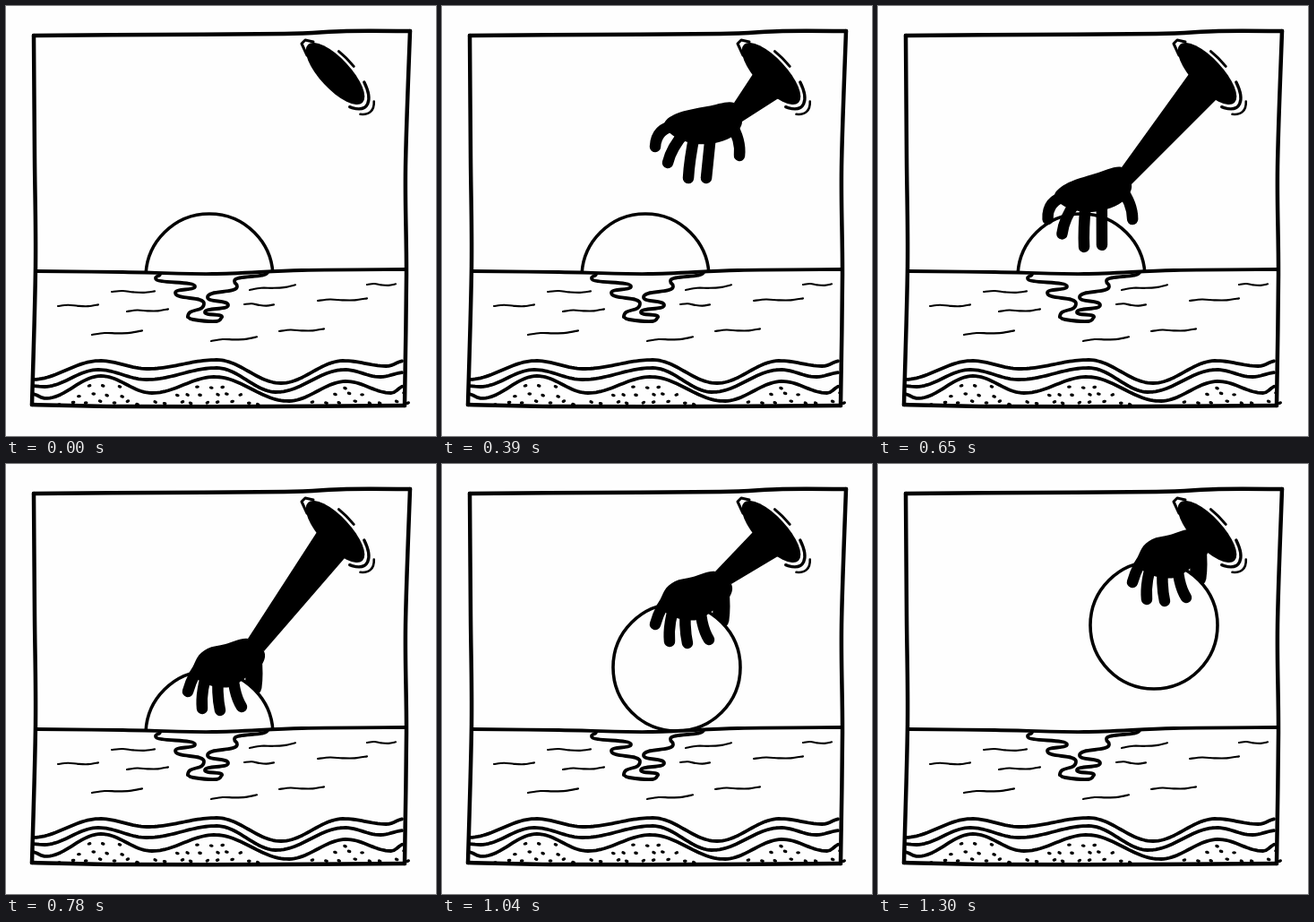
Write an HTML page with a canvas that moves like this. It is 480 by 480 pixels and loops after 1430 ms.

```html
<!DOCTYPE html>
<html lang="en">
<head>
<meta charset="utf-8">
<title>Hand taking the sun</title>
<style>
html, body { margin: 0; width: 100%; height: 100%; overflow: hidden; background: #fefefe; }
canvas { display: block; width: 480px; height: 480px; }
</style>
</head>
<body>
<canvas id="stage" width="480" height="480"></canvas>
<script>
const ctx = document.getElementById('stage').getContext('2d');
const INK = '#000', PAPER = '#fefefe';
const STEP = 130, STEPS = 11, HORIZON = 297;

// Hands are measured from the upper side of the wrist.
// A finger is base, bend, tip; the thumb comes last.
const OPEN = {
  palm: [[0, 0], [-30, 4], [-64, 12], [-78, 24], [-66, 38], [-42, 46], [-17, 44], [0, 36], [9, 21]],
  fingers: [
    [-64, 25, -87, 28, -88, 49], [-54, 32, -70, 50, -74, 67],
    [-44, 35, -50, 65, -51, 84], [-26, 35, -29, 65, -31, 84], [-4, 22, 8, 42, 6, 59]
  ]
};
const GRIP = {
  palm: [[0, 0], [-25, 6], [-45, 11], [-57, 22], [-61, 40], [-43, 52], [-20, 54], [-3, 44], [15, 30], [18, 14]],
  fingers: [
    [-49, 25, -61, 38, -67, 59], [-43, 30, -53, 58, -51, 78],
    [-33, 35, -35, 62, -31, 80], [-17, 30, -17, 60, -7, 76], [6, 20, 8, 40, 6, 54]
  ]
};
const PULL = [[270, 195], [283, 173], [305, 120], [328, 96], [351, 73]];

// Crests and troughs of the three surf lines
const SURF = [
  [[29, 417], [105, 396], [158, 405], [235, 395], [307, 421], [377, 396], [425, 402], [445, 396]],
  [[29, 424], [42, 425], [103, 406], [157, 417], [235, 404], [302, 431], [378, 406], [418, 414], [445, 409]],
  [[29, 433], [44, 438], [106, 413], [163, 432], [233, 414], [315, 441], [380, 419], [430, 432], [445, 424]]
];

// x, y, length, rise
const RIPPLES = [
  [118, 319, 48, 0], [58, 335, 45, 1], [135, 341, 46, 2], [96, 367, 56, 4], [229, 374, 51, 4],
  [305, 363, 50, 2], [266, 333, 33, -1], [272, 317, 51, 5], [348, 329, 55, 2], [403, 311, 32, 0]
];

const BORDER = [
  [[31, 33], [171, 32], [311, 31], [380, 28], [451, 28]],
  [[451, 28], [446, 180], [447, 300], [445, 446]],
  [[29, 445], [130, 447], [300, 447], [445, 446]],
  [[31, 33], [32, 170], [33, 290], [29, 445]]
];

// Small seeded generator
function random(seed) {
  return () => (seed = seed * 16807 % 2147483647) / 2147483647;
}

// Smooth curve through points
function trace(pts, closed) {
  const n = pts.length;
  const at = i => pts[closed ? (i + n) % n : Math.max(0, Math.min(n - 1, i))];
  ctx.beginPath();
  ctx.moveTo(...pts[0]);
  for (let i = 0; i < (closed ? n : n - 1); i++) {
    const [a, b, c, d] = [at(i - 1), at(i), at(i + 1), at(i + 2)];
    ctx.bezierCurveTo(
      b[0] + (c[0] - a[0]) / 6, b[1] + (c[1] - a[1]) / 6,
      c[0] - (d[0] - b[0]) / 6, c[1] - (d[1] - b[1]) / 6, ...c);
  }
}

function polyline(pts) {
  ctx.beginPath();
  pts.forEach(p => ctx.lineTo(...p));
}

function stroke(width) {
  ctx.lineWidth = width;
  ctx.stroke();
}

function fill(color = INK) {
  ctx.fillStyle = color;
  ctx.fill();
}

// Path that swings from one turning point to the next
function swing(pts) {
  ctx.beginPath();
  ctx.moveTo(...pts[0]);
  for (let i = 1; i < pts.length; i++) {
    const [[x, y], [u, v]] = [pts[i - 1], pts[i]], dy = 0.7 * (v - y);
    ctx.bezierCurveTo(x, y + dy, u, v - dy, u, v);
  }
  stroke(3.8);
}

// Cosine blend between crests and troughs
function waveY(keys, x) {
  const i = keys.findIndex(k => k[0] >= x);
  if (i < 1) return keys[0][1];
  const [[x0, y0], [x1, y1]] = [keys[i - 1], keys[i]];
  return y0 + (y1 - y0) * (1 - Math.cos(Math.PI * (x - x0) / (x1 - x0))) / 2;
}

function sea() {
  trace([[33, 296], [130, 297], [230, 299], [330, 295], [446, 294]]);
  stroke(3.8);
  swing([[172, 299], [167, 304], [211, 313], [189, 320], [221, 332], [203, 347]]);
  swing([[292, 297], [255, 307], [258, 313], [225, 325], [248, 334], [222, 342], [241, 347]]);
  trace([[203, 347], [209, 350], [235, 352], [241, 347]]);
  stroke(3.8);
  for (const [x, y, len, rise] of RIPPLES) {
    const pts = [0, 0.25, 0.5, 0.75, 1].map(t => [x + t * len, y - t * rise - Math.sin(t * 7)]);
    trace(pts);
    stroke(2.1);
  }
}

function beach() {
  for (const keys of SURF) {
    ctx.beginPath();
    for (let x = 31; x <= 444; x += 3) ctx.lineTo(x, waveY(keys, x));
    stroke(3.8);
  }
  const rnd = random(71);
  for (let row = 0; row < 3; row++) {
    for (let col = 0; col < 27; col++) {
      const x = 46 + col * 15 + row * 5 + rnd() * 6, y = 423 + row * 9 + rnd() * 4;
      if (y < waveY(SURF[2], x) + 6) continue;
      ctx.beginPath();
      ctx.ellipse(x, y, 2.4, 1.7, rnd() - 0.5, 0, Math.PI * 2);
      fill();
    }
  }
}

function portal() {
  const tilt = 0.82;
  const ring = (a, b, from, to) => {
    ctx.beginPath();
    ctx.ellipse(367.5, 75.5, a, b, tilt, from, to);
  };
  ring(44.5, 17, 0, Math.PI * 2);
  fill();
  ring(50, 21, -0.95, 0.7);
  stroke(3.4);
  ring(58, 24, -0.45, 0.45);
  stroke(2.6);
  ring(48, 21, -1.9, -1.4);
  stroke(3);
  polyline([[343, 40], [334, 38], [330, 42], [336, 55]]);
  stroke(3);
}

function sun(x, y) {
  ctx.save();
  ctx.beginPath();
  ctx.rect(0, 0, 480, HORIZON + 1);
  ctx.clip();
  ctx.beginPath();
  ctx.arc(x, y, 71, 0, Math.PI * 2);
  fill(PAPER);
  stroke(3.6);
  ctx.restore();
}

// Only the side in front of the portal shows
function inFront(paint) {
  ctx.save();
  polyline([[325, 31], [405, 114], [405, 480], [0, 480], [0, 31]]);
  ctx.clip();
  paint();
  ctx.restore();
}

function finger([bx, by, cx, cy, tx, ty], width) {
  ctx.beginPath();
  ctx.moveTo(bx, by);
  ctx.quadraticCurveTo(cx, cy, tx, ty);
  stroke(width);
}

function arm({ shape, x, y }) {
  const [ex, ey] = shape.palm.at(-1);
  polyline([[x, y], [x + ex, y + ey], [385, 97], [347, 76]]);
  fill();
}

function atWrist({ x, y, turn }, paint) {
  ctx.save();
  ctx.translate(x, y);
  ctx.rotate(turn);
  paint();
  ctx.restore();
}

// The hand reaches down evenly, turns onto the sun, then pulls it up
function poseAt(step) {
  if (step === 0) return null;
  if (step < 5) return { shape: OPEN, x: 428 - 34 * step, y: 9 + 33 * step, turn: 0 };
  if (step === 5) return { shape: OPEN, x: 272, y: 180, turn: -0.105 };
  const [x, y] = PULL[step - 6];
  return { shape: GRIP, x, y, turn: 0 };
}

function draw(step) {
  const pose = poseAt(step);
  const held = pose && pose.shape === GRIP;
  ctx.fillStyle = PAPER;
  ctx.fillRect(0, 0, 480, 480);
  ctx.strokeStyle = INK;
  ctx.lineCap = ctx.lineJoin = 'round';

  // A gripping thumb lies behind the sun
  if (held) inFront(() => atWrist(pose, () => finger(pose.shape.fingers[4], 19)));
  if (held) sun(pose.x - 43, pose.y + 107);
  else sun(227, 303);

  sea();
  beach();
  BORDER.forEach(side => { trace(side); stroke(4.5); });

  if (pose) inFront(() => {
    arm(pose);
    atWrist(pose, () => {
      trace(pose.shape.palm, true);
      fill();
      pose.shape.fingers.slice(0, held ? 4 : 5).forEach(f => finger(f, 12.5));
    });
  });
  portal();
}

function tick(now) {
  draw(Math.floor(now / STEP) % STEPS);
  requestAnimationFrame(tick);
}
draw(0);
requestAnimationFrame(tick);
</script>
</body>
</html>
```
